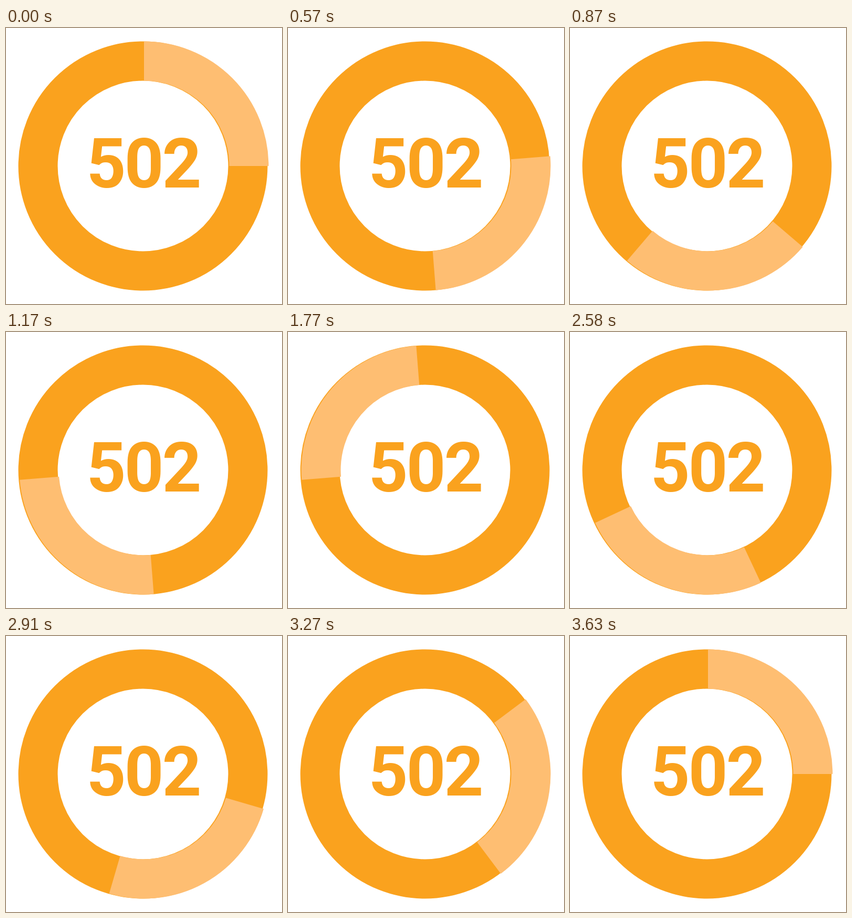
An HTML page that plays this animation: 526x526 px, repeating every 3660 ms.

```html
<!DOCTYPE html>
<html lang="en">
<head>
<meta charset="utf-8">
<title>502</title>
<style>
  html, body { margin: 0; height: 100%; overflow: hidden; background: #fff; }
  svg { display: block; width: 526px; height: 526px; }
  circle, path { fill: none; stroke-width: 75; }
  circle { stroke: #faa21e; }
  path { stroke: #febe72; }
  text { font: 700 131px Roboto, sans-serif; fill: #faa21e; text-anchor: middle; }
</style>
</head>
<body>
<svg viewBox="0 0 526 526">
  <circle cx="261" cy="263" r="200"/>
  <path id="sweep" d="M263 63A200 200 0 0 1 463 263"/>
  <text x="191 263 335" y="304">502</text>
</svg>
<script>
  const STEP = 30, LOOP = 3660, TURN = 1800, END = 3630, MAX_ANGLE = 270;
  const sweep = document.getElementById('sweep');

  // Linear swing out to MAX_ANGLE, then slightly slower back to rest.
  function angleAt(time) {
    const t = Math.floor((time % LOOP) / STEP + 0.01) * STEP;
    const progress = t < TURN ? t / TURN : Math.max(0, (END - t) / (END - TURN));
    return MAX_ANGLE * progress;
  }

  function draw() {
    sweep.setAttribute('transform', `rotate(${angleAt(performance.now())} 263 263)`);
    requestAnimationFrame(draw);
  }
  draw();
</script>
</body>
</html>
```
